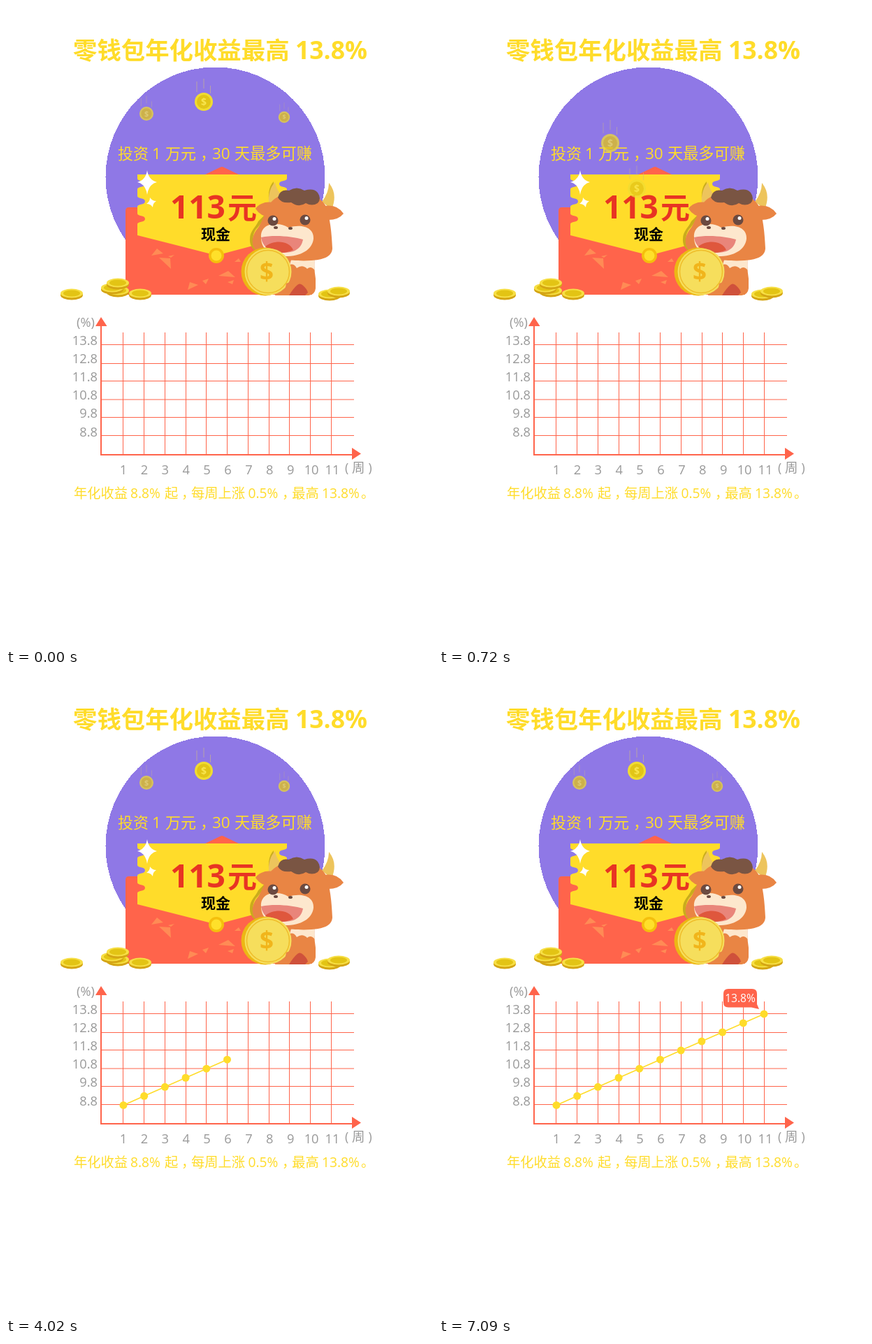
Write an HTML page that moves like this. It is 611 px wide and 917 px high and loops after 7560 ms.

```html
<!DOCTYPE html>
<html lang="zh-CN">
<head>
<meta charset="utf-8">
<title>零钱包</title>
<style>
html, body { margin: 0; width: 100%; height: 100%; overflow: hidden; background: #fff; }
svg { display: block; width: 100%; height: 100%; }
text { font-family: "Open Sans", "Noto Sans", "Noto Sans CJK SC", "Noto Sans CJK", sans-serif; }
.zh { font-family: "Noto Sans CJK SC", "Noto Sans CJK", sans-serif; }
.bold { font-weight: 700; }
.yellow { fill: #ffdc2a; }
.mid { text-anchor: middle; }
.end { text-anchor: end; }
</style>
</head>
<body>
<svg viewBox="0 0 611 917" lang="zh-CN">
  <defs>
    <g id="coin">
      <path d="M-10 -29V-14M0 -33V-19M9.5 -23V-12" stroke="#c9b48c" stroke-opacity=".7"/>
      <circle r="13" fill="#f0dc32"/>
      <circle r="10" fill="#e2c518"/>
      <text class="mid bold" y="5" font-size="14" fill="#f8e550">$</text>
    </g>
    <g id="flat">
      <ellipse cy="1.5" rx="16" ry="7" fill="#d4a514"/>
      <ellipse cy="-1" rx="16" ry="6.5" fill="#f7df45"/>
      <ellipse cy="-1" rx="12" ry="4.5" fill="#e3c414"/>
    </g>
  </defs>

  <circle cx="299.5" cy="244.5" r="157" fill="#8f78e6" shape-rendering="crispEdges"/>

  <!-- envelope -->
  <g id="envelope">
    <path d="M283 242L307 230.5Q309 229.5 311 230.5L335 242Z" fill="#ff644b"/>
    <path d="M171 293Q171 288 176 288H438V413H171Z" fill="#ff644b"/>
    <path id="ticket" fill="#ffdc2a"/>
    <g fill="#ff8b55">
      <path d="M208 357L216 347L225 354ZM219 360L235 361L236 376ZM232 358L241 356L236 360Z"/>
      <path d="M260 406L263 395L275 399ZM281 393L290 390L286 398ZM304 386L318 379L328 388Z"/>
      <path d="M317 395L326 392L324 398ZM327 366L333 361L336 366Z"/>
    </g>
    <circle cx="301" cy="357" r="11" fill="#f5bf0c"/>
    <circle cx="301" cy="357" r="7.5" fill="#ffe02a"/>
    <path d="M202 235Q204 249 216 252Q204 255 202 270Q200 255 188 252Q200 249 202 235Z" fill="#fff"/>
    <path d="M206 274Q209 279 215 279Q210 282 210 288Q207 283 201 283Q206 280 206 274Z" fill="#fff"/>
  </g>

  <!-- bull -->
  <g id="bull">
    <path d="M377 283C374 268 377 257 383 251L381 290L360 317C352 324 352 338 357 346L362 353Q348 347 349 333C349 322 357 317 361 308L369 300Z" fill="#c9ac1c"/>
    <path d="M376 283C375 268 379 258 385 252Q387 264 396 272ZM452 280Q462 267 462 253C471 264 472 276 466 291Z" fill="#edc45c"/>
    <path d="M357 290C363 281 377 278 388 283L378 302Q364 301 357 290ZM455 286Q474 283 483 297Q476 306 461 306Z" fill="#e98544"/>
    <path d="M395 352H442Q440 372 443 390V404Q442 413 433 414H385Z" fill="#e98544"/>
    <path d="M409 360H442Q440 368 442 378Q436 371 431 376Q424 369 416 375Q412 368 406 370Z" fill="#fde7cd"/>
    <path d="M375 288C385 262 440 258 457 285C464 302 466 325 467 347C466 360 452 363 437 364C410 366 372 360 359 351C349 342 352 327 361 317C366 309 369 300 375 288Z" fill="#e98544"/>
    <path d="M389 274Q392 261 405 264Q416 257 427 264Q440 260 446 267Q452 276 446 282Q438 287 429 282Q419 289 408 281Q394 283 389 274Z" fill="#7a5543"/>
    <path d="M365 331C364 318 374 311 387 312Q396 312 404 317C424 311 441 317 440 333C438 350 420 359 396 358C377 358 365 347 365 331Z" fill="#fde7cd"/>
    <path d="M365 331C386 327 410 330 425 334C422 350 409 353 396 353C378 353 367 345 365 331Z" fill="#e9857a"/>
    <path d="M371 344C380 336 404 333 411 349Q398 355 384 352Q375 349 371 344Z" fill="#df573d"/>
    <g fill="#6b4a40">
      <circle cx="382" cy="307" r="7.5"/><circle cx="428" cy="306" r="7.5"/>
      <ellipse cx="386" cy="317" rx="3" ry="2"/><ellipse cx="407" cy="318" rx="3" ry="2"/>
    </g>
    <g fill="#fff"><circle cx="384" cy="304.5" r="2.5"/><circle cx="430" cy="303.5" r="2.5"/></g>
    <path d="M405 414Q411 404 417 399Q420 396 424 399Q431 405 432 410L428 414Z" fill="#cf513b"/>
    <circle cx="371" cy="380" r="34.5" fill="#edb714"/>
    <circle cx="375" cy="380" r="33.5" fill="#f6de5c"/>
    <circle cx="375" cy="380" r="30.5" fill="none" stroke="#efbd2a" stroke-width="1.5"/>
    <text class="mid bold" x="373" y="392" font-size="35" fill="#f1b51b">$</text>
    <path d="M401 397Q410 393 411 402Q409 410 399 408Z" fill="#e98544"/>
  </g>

  <g id="piles"></g>
  <g id="labels"></g>

  <!-- chart -->
  <path id="grid" fill="none" stroke="#ff644b"/>
  <path d="M136 456V642H497" fill="none" stroke="#ff644b" stroke-width="2"/>
  <path d="M128 458L136 445L144.5 458ZM495 632V649L508 640.5Z" fill="#ff644b"/>
  <path id="line" fill="none" stroke="#ffdc2a" stroke-width="1.6"/>
  <g id="dots"></g>
  <g id="bubble">
    <path d="M7 0H41Q48 0 48 7V22L51 29L40 26.5H7Q0 26.5 0 19.5V7Q0 0 7 0Z" fill="#ff644b"/>
    <text id="rate" class="mid" x="24" y="18.5" font-size="15.6" fill="#fff"></text>
  </g>

  <g id="coins"></g>
</svg>

<script>
const LOOP = 7560, TICK = 30, FIRST = 1020, GAP = 600, COUNT = 11;
const $ = id => document.getElementById(id);

function add(parent, tag, attrs, text = '') {
  const el = document.createElementNS('http://www.w3.org/2000/svg', tag);
  for (const key in attrs) el.setAttribute(key, attrs[key]);
  el.textContent = text;
  return parent.appendChild(el);
}

function label(text, x, y, size, cls = 'yellow', fill = '') {
  const zh = /[^\x00-\x7f]/.test(text) ? ' zh' : '';
  const attrs = { x, y, 'font-size': size, class: cls + zh };
  if (fill) attrs.fill = fill;
  add($('labels'), 'text', attrs, text);
}

// Scalloped ticket edges
const scallopUp = 'v-10c0 -4 11 -2 11 -7.5s-11 -3.5 -11 -7.5';
const scallopDown = 'c0 4 -11 2 -11 7.5s11 3.5 11 7.5v10';
$('ticket').setAttribute('d',
  'M188 241H402v6' + scallopDown.repeat(3) + 'V330L308 355Q301 358 294 355L188 328V322' +
  scallopUp.repeat(3) + 'Z');

for (const [x, y] of [[94, 412], [160, 408], [152, 404], [160, 397], [192, 412], [463, 413], [476, 409]])
  add($('piles'), 'use', { href: '#flat', x, y });

// Headings and captions
label('零钱包年化收益最高', 96, 76, 34.4, 'yellow bold');
label('13.8%', 414, 75.5, 35.5, 'yellow bold');

label('投资', 160, 219, 22);
label('1', 209, 219, 22.5);
label('万元', 228, 219, 22);
label('，', 278, 219, 22);
label('30', 295, 219, 22.5);
label('天最多可赚', 327, 219, 22.2);

label('113', 235, 304, 46, 'bold', '#e83423');
label('元', 317, 304, 42, 'bold', '#e83423');
label('现金', 279, 334, 21, 'bold', '#000');

label('年化收益', 97, 704, 19.3);
label('8.8%', 178, 704, 19.2);
label('起', 227, 704, 19.3);
label('，', 251, 704, 19.3);
label('每周上涨', 265, 704, 19.3);
label('0.5%', 346.5, 704, 19.2);
label('，', 395, 704, 19.3);
label('最高', 409.3, 704, 19.3);
label('13.8%', 452, 704, 19.2);
label('。', 508, 704, 19.3);

// Axes
const GRAY = '#999';
const px = n => 168 + 29.7 * n;
const py = n => 615.4 - 13.05 * n;
const gridX = n => Math.floor(167.7 + 29.78 * n) + 0.5;
const rows = [484.5, 511.5, 536.5, 563, 588.5, 614.5];
let grid = '';
rows.forEach((y, i) => {
  grid += `M136 ${y}H498`;
  label((13.8 - i).toFixed(1), 131, 485 + 26.1 * i, 18.3, 'end', GRAY);
});
for (let n = 0; n < COUNT; n++) {
  grid += `M${gridX(n)} 467V641`;
  label(String(n + 1), 168 + 29.9 * n, 670, 18.3, 'mid', GRAY);
  add($('dots'), 'circle', { cx: px(n), cy: py(n), r: 5.5, fill: '#ffdc2a' });
}
$('grid').setAttribute('d', grid);
label('(%)', 101, 459, 18.3, '', GRAY);
label('(', 485, 667, 17.5, '', GRAY);
label('周', 495, 667, 18.5, '', GRAY);
label(')', 518.5, 667, 17.5, '', GRAY);

const bubbleX = [107, 140, 171, 200, 228, 258, 287, 319, 347, 375, 407];
const bubbleY = [581, 566, 555, 541, 528, 517, 502, 490, 475, 463, 449];

// Coins
const clamp = v => Math.max(0, Math.min(1, v));
const rest = [[201, 154, 0.77, 0.75], [283, 137, 1, 1], [398, 159, 0.63, 0.75]];
const sprites = [...rest, 0].map(() => add($('coins'), 'use', { href: '#coin' }));

function place(i, x, y, scale, alpha) {
  sprites[i].setAttribute('transform', `translate(${x} ${y}) scale(${scale})`);
  sprites[i].setAttribute('opacity', alpha);
}

function drawCoins(t) {
  const f = Math.floor(t / TICK);
  const falling = f < 27;
  const leave = clamp((27 - f) / 4);
  rest.forEach(([x, y, scale, alpha], i) => {
    if (!falling) place(i, x, y, scale, alpha * clamp((f - 26) / 7));
    else if (i === 1) place(i, x, y + 74 * (f / 16) ** 1.28, scale, leave);
    else place(i, x, y + 4.6 * f, scale, alpha * clamp(1 - f / 10));
  });
  place(3, 245, 116 + 5 * (f - 8), 1, falling ? clamp((f - 7) / 4) * leave : 0);
}

function drawChart(t) {
  const since = t - FIRST;
  const shown = since < 0 ? 0 : Math.min(COUNT, Math.floor(since / GAP) + 1);
  let d = '';
  [...$('dots').children].forEach((dot, n) => {
    const on = n < shown;
    dot.setAttribute('visibility', on ? 'visible' : 'hidden');
    if (on) d += `${n ? 'L' : 'M'}${px(n)} ${py(n)}`;
  });
  $('line').setAttribute('d', d);

  const n = shown - 1;
  const open = n >= 0 && since - n * GAP >= 70;
  $('bubble').setAttribute('visibility', open ? 'visible' : 'hidden');
  if (open) {
    $('bubble').setAttribute('transform', `translate(${bubbleX[n]} ${bubbleY[n]})`);
    $('rate').textContent = (8.8 + n / 2).toFixed(1) + '%';
  }
}

const start = performance.now();
function draw() {
  const t = Math.max(0, performance.now() - start) % LOOP;
  drawCoins(t);
  drawChart(t);
  requestAnimationFrame(draw);
}
draw();
</script>
</body>
</html>
```
